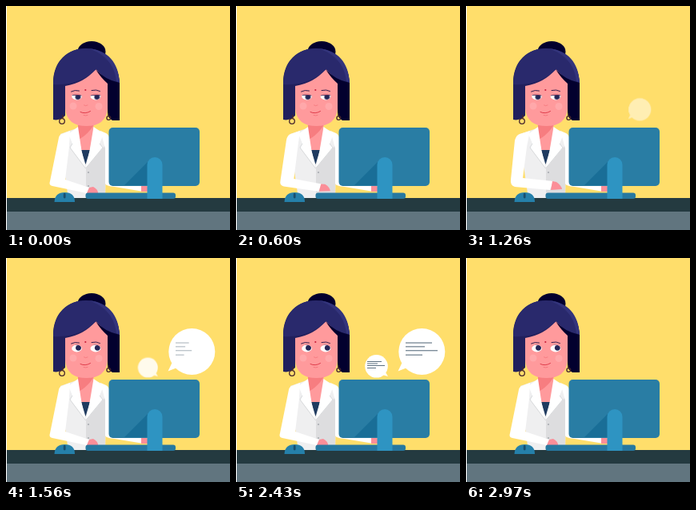
Recreate the animation shown at these times as an HTML page without scripts. Size 280x280 px, loop 3.12 s.

```html
<!DOCTYPE html>
<html lang="en">
<head>
<meta charset="utf-8">
<title>Doctor at her desk</title>
<style>
  html, body { margin: 0; width: 100%; height: 100%; overflow: hidden; background: #ffde6b; }
  svg { display: block; width: 100vw; height: 100vh; }

  .bubble, .lines rect, .gaze, .lid { animation: 3.12s linear infinite; }

  /* Bubbles grow out of the tip of their tail */
  .big { transform-origin: 203px 141px; animation-name: big; }
  .small { transform-origin: 190px 148px; animation-name: small; }
  @keyframes big {
    0%, 35.6% { transform: scale(0); opacity: 0; }
    45.5%, 81.7% { transform: none; opacity: 1; }
    91.3%, 100% { transform: scale(0); opacity: 0; }
  }
  @keyframes small {
    0%, 41.3% { transform: scale(0); opacity: 0; }
    51.3%, 80.1% { transform: none; opacity: 1; }
    89%, 100% { transform: scale(0); opacity: 0; }
  }

  .lines rect { fill: #5d7080; transform-box: fill-box; transform-origin: left; }
  .big .lines rect { animation-name: write; }
  .small .lines rect { animation-name: writeSmall; }
  @keyframes write {
    0%, 46.2% { transform: scaleX(0); opacity: 0; }
    53.8%, 100% { transform: none; opacity: 1; }
  }
  @keyframes writeSmall {
    0%, 51.9% { transform: scaleX(0); opacity: 0; }
    59.6%, 100% { transform: none; opacity: 1; }
  }

  .gaze { animation-name: gaze; }
  .lid { animation-name: lid; }
  @keyframes gaze {
    0%, 43% { transform: translate(-.5px, 1.5px); }
    48%, 100% { transform: none; }
  }
  @keyframes lid {
    0%, 43% { transform: none; }
    48%, 100% { transform: translateY(-3px); }
  }
</style>
</head>
<body>
<svg viewBox="0 0 280 280" preserveAspectRatio="none">
  <defs>
    <clipPath id="eyes">
      <ellipse cx="88.5" cy="113" rx="6.3" ry="4.4"/>
      <ellipse cx="112" cy="113" rx="6.5" ry="4.4"/>
    </clipPath>
  </defs>

  <rect width="280" height="280" fill="#ffde6b"/>

  <!-- Bun -->
  <ellipse cx="107" cy="57" rx="17.5" ry="13" fill="#02002e"/>

  <!-- Coat body -->
  <path d="M68 160L91 152H109L126 160L124 241H78L72 200Z" fill="#efeff0"/>
  <path d="M100 203L124 174V241H100Z" fill="#dddddf"/>

  <!-- Neck and top -->
  <path d="M90 143H109.500V162L104.500 181H94.500L90 162Z" fill="#ff9a9c"/>
  <path d="M90 149H109.500Q103 160 91 167L90 162Z" fill="#f77d80"/>
  <path d="M94 180H105L99.500 198Z" fill="#1f3b60"/>

  <!-- Lapels -->
  <path d="M90 151L78 160L83 172L80 177L99.500 203L94.500 181Z" fill="#fff"/>
  <path d="M109.500 151L122 160L117 172L121 177L99.500 203L104.500 181Z" fill="#fff"/>
  <path d="M83 172L80 177L99.500 203M117 172L121 177L99.500 203" fill="none" stroke="#cfd1d4" stroke-width=".8"/>
  <circle cx="103" cy="208" r="1" fill="#a4a9ae"/>
  <circle cx="103" cy="225" r="1" fill="#a4a9ae"/>

  <!-- Right arm -->
  <path d="M118 156L125 159Q129 161 130 168V223H172V232L136 226Q125 225 124 222V178Z" fill="#fff"/>
  <path d="M169 225H176Q179 229 178 232H169Z" fill="#fb8e98"/>

  <!-- Left arm -->
  <path fill="#fff">
    <animate attributeName="d" dur="3.12s" repeatCount="indefinite" keyTimes="0;.12;.25;.41;.49;1" values="
      M80 156L70 160Q66 161 65.500 167L55 219Q53 224 58 225L101 234L104 227L74 217L79 176Z;
      M80 156L70 160Q66 161 65.500 167L55 219Q53 224 58 225L101 234L104 227L74 217L79 176Z;
      M80 156L67 160Q63 161 61 168L56 217Q55 224 61 226L105 230L109 219L71 215L76 176Z;
      M80 156L67 160Q63 161 61 168L56 217Q55 224 61 226L105 230L109 219L71 215L76 176Z;
      M80 156L70 160Q66 161 65.500 167L55 219Q53 224 58 225L101 234L104 227L74 217L79 176Z;
      M80 156L70 160Q66 161 65.500 167L55 219Q53 224 58 225L101 234L104 227L74 217L79 176Z"/>
  </path>
  <path fill="#fb8e98">
    <animate attributeName="d" dur="3.12s" repeatCount="indefinite" keyTimes="0;.12;.25;.41;.49;1" values="
      M104 227L109 226Q115 229 115 234L101 234Z;
      M104 227L109 226Q115 229 115 234L101 234Z;
      M108 219L113 220Q119 224 120 229L106 230Z;
      M108 219L113 220Q119 224 120 229L106 230Z;
      M104 227L109 226Q115 229 115 234L101 234Z;
      M104 227L109 226Q115 229 115 234L101 234Z"/>
  </path>

  <!-- Face -->
  <path d="M74 90L100 76H118L127 90V128Q125 150 100.500 150T74 128Z" fill="#ff9a9c"/>
  <circle cx="84" cy="125" r="4.500" fill="#ffa8aa"/>
  <circle cx="116" cy="125.500" r="4.500" fill="#ffa8aa"/>

  <g clip-path="url(#eyes)">
    <rect x="80" y="106" width="42" height="14" fill="#fff"/>
    <g class="gaze" fill="#252657">
      <circle cx="90.500" cy="112.300" r="3.400"/>
      <circle cx="114.300" cy="112.300" r="3.400"/>
    </g>
    <path class="lid" d="M78 100H123V111.500Q112 111 104 112H96Q89 111 78 111.500Z" fill="#f98c90" stroke="#33204f" stroke-width=".8"/>
  </g>
  <g fill="none" stroke="#33204f" stroke-linecap="round">
    <path d="M81.500 107Q86 104.500 91.500 106M107 105.500Q113 104 117.500 106.500" stroke-width="1"/>
    <path d="M97.500 124Q99.500 125.500 102 124" stroke="#f4757c" stroke-width=".8"/>
    <path d="M93 132.500Q99 135.500 105.500 131.500" stroke="#de3c4a" stroke-width="1"/>
    <path d="M97 136.500Q99.500 137.500 102 136.500" stroke="#f4757c" stroke-width="1"/>
  </g>
  <circle cx="99.300" cy="105" r="1.100" fill="#c8203b"/>

  <!-- Front hair -->
  <path d="M59 142V96C59 68 78 53 100 53S141 70 142 96L112 79Q98 96 74 100V137Q67 144 59 142Z" fill="#21205d"/>
  <path d="M59 98C59 68 78 53 100 53S141 70 142 97Q123 94 113 79Q91 100 59 98Z" fill="#29296c"/>
  <path d="M104 53.200C127 55 141 71 142 96L138 94C136 74 124 60 104 53.200Z" fill="#33347c"/>
  <path d="M112 79Q123 92 142 96V143H133Q127 140 127 133V97Q118 89 112 79Z" fill="#02002e"/>

  <!-- Earrings -->
  <g fill="none" stroke="#45252c" stroke-width="1.300">
    <circle cx="70" cy="144" r="3.300"/>
    <circle cx="128.300" cy="140" r="2.400"/>
    <path d="M71 136V140M128 134V137"/>
  </g>

  <!-- Desk -->
  <rect y="240" width="280" height="17" fill="#243a40"/>
  <rect y="257" width="280" height="23" fill="#61757f"/>

  <!-- Monitor, keyboard and mouse -->
  <rect x="128.500" y="152" width="113.500" height="73" rx="5" fill="#297da4"/>
  <path d="M148 224L177 195V224Z" fill="#196e97"/>
  <rect x="99.500" y="233.500" width="112.500" height="7.500" rx="3" fill="#2678a0"/>
  <path d="M176.500 241V198.500A9.500 9.500 0 0 1 195.500 198.500V241Z" fill="#2e94c2"/>
  <path d="M60.500 245Q61 233 73.500 233T86 245Z" fill="#2580aa"/>
  <rect x="71.800" y="234" width="2.800" height="6.500" rx="1.400" fill="#194f6e"/>

  <!-- Speech bubbles -->
  <g class="bubble big" fill="#fff">
    <circle cx="232.300" cy="117" r="29"/>
    <path d="M207.500 131L202.500 141.500L214 137Z"/>
    <g class="lines">
      <rect x="212" y="105.500" width="33" height="1.100"/>
      <rect x="212" y="110.300" width="24" height="1.100"/>
      <rect x="212" y="115.200" width="40" height="1.100"/>
      <rect x="212" y="120.600" width="21" height="1.100"/>
    </g>
  </g>
  <g class="bubble small" fill="#fff">
    <circle cx="175.500" cy="135.300" r="14.300"/>
    <path d="M187 143L190 148L183 146Z"/>
    <g class="lines">
      <rect x="164" y="129" width="18" height="1"/>
      <rect x="164" y="131.500" width="13" height="1"/>
      <rect x="164" y="134" width="22" height="1"/>
      <rect x="164" y="137" width="11" height="1"/>
    </g>
  </g>

  <rect width="1" height="280" fill="#fff"/>
</svg>
</body>
</html>
```
